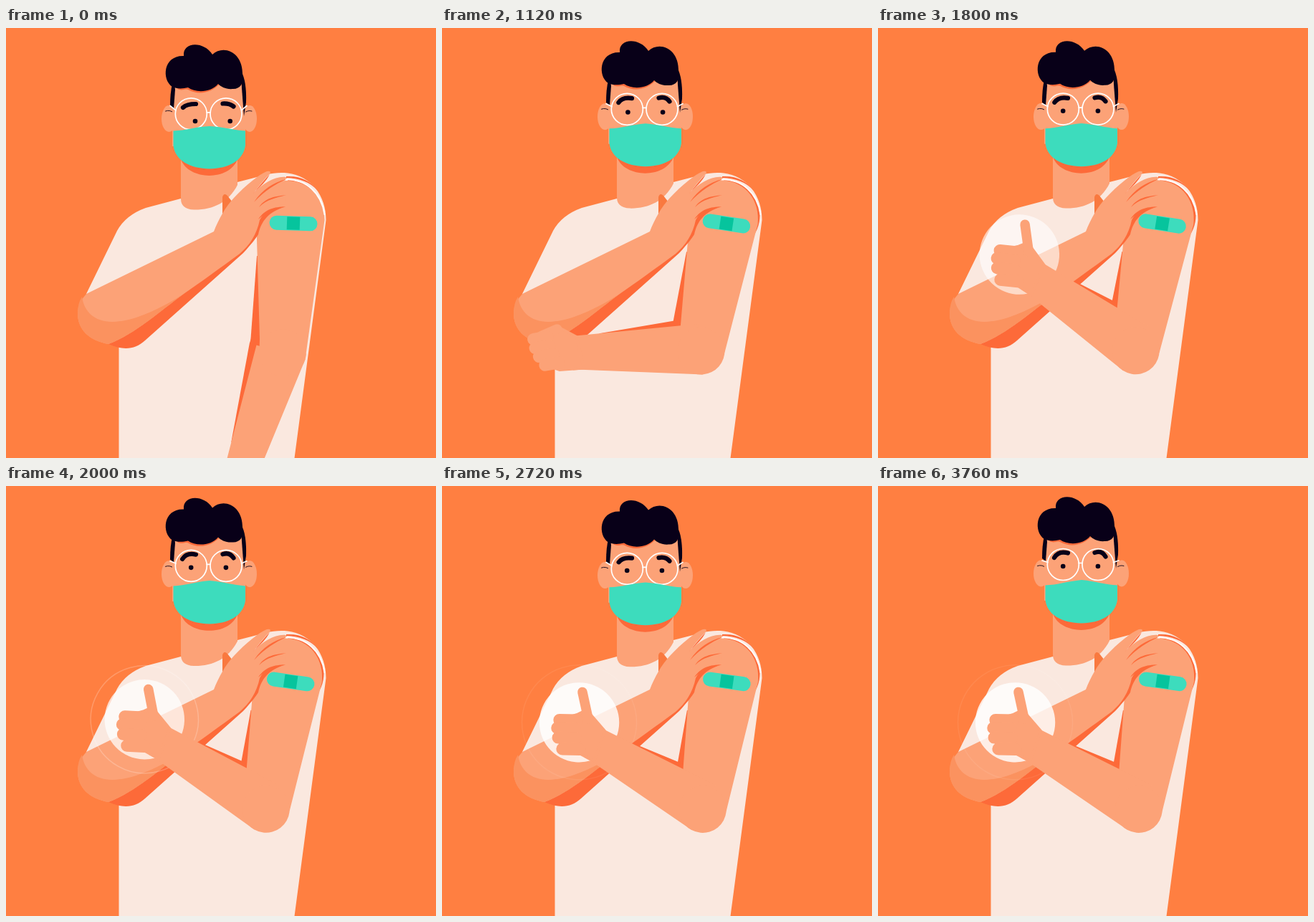
Write an HTML page with a canvas that moves like this. It is 600x600 px and loops after 4200 ms.

```html
<!DOCTYPE html>
<html lang="en">
<head>
<meta charset="utf-8">
<title>Vaccinated</title>
<style>
  html, body { margin: 0; width: 100%; height: 100%; overflow: hidden; background: #ff7f41; }
  canvas { display: block; width: 600px; height: 600px; }
</style>
</head>
<body>
<canvas id="stage" width="600" height="600"></canvas>
<script>
const ctx = document.getElementById('stage').getContext('2d');
const LOOP = 4200, STEP = 40;
const C = {
  bg: '#ff7f41', skin: '#fca277', elbow: '#fb925f', shade: '#fd6a39', thumb: '#f9793f',
  shirt: '#fae8df', hair: '#080018', mask: '#3ddcbd', pad: '#06c49d', white: '#fff'
};

const mix = (a, b, k) => a + (b - a) * k;
const rad = deg => deg * Math.PI / 180;
const part = (t, from, to) => Math.min(1, Math.max(0, (t - from) / (to - from)));
const ease = (t, from, to) => (1 - Math.cos(Math.PI * part(t, from, to))) / 2;
const easeOut = (t, from, to) => 1 - (1 - part(t, from, to)) ** 2;
const dip = (t, from, to) => Math.sin(Math.PI * part(t, from, to)) ** 2;

// Everything that moves, as a function of time
function poseAt(t) {
  const raise = ease(t, 840, 1320), pop = ease(t, 1440, 1680);
  return {
    swing: 10.4 * raise - 4.5 * easeOut(t, 1400, 2200),
    bend: 16 + 111 * raise - 9 * ease(t, 1400, 2200),
    lift: raise - 0.35 * dip(t, 1400, 2200) - dip(t, 2600, 3040),
    gaze: ease(t, 840, 1240),
    lids: 1 - 0.9 * (dip(t, 320, 520) + dip(t, 3560, 3760)),
    thumb: ease(t, 1400, 1640),
    discR: 55.7 * pop,
    discA: 0.6 * pop + 0.22 * ease(t, 1800, 2160),
    ringR: 56 + 24 * easeOut(t, 1760, 2200),
    ringA: t > 1800 ? mix(0.35, 0.07, ease(t, 1800, 2200)) : 0
  };
}

function fill(d, color) {
  ctx.fillStyle = color;
  ctx.fill(new Path2D(d));
}

function line(d, color, width) {
  ctx.strokeStyle = color;
  ctx.lineWidth = width;
  ctx.stroke(new Path2D(d));
}

function oval(x, y, rx, ry, color) {
  ctx.beginPath();
  ctx.ellipse(x, y, rx, ry, 0, 0, 2 * Math.PI);
  ctx.fillStyle = color;
  ctx.fill();
}

function ring(x, y, r, color, width) {
  ctx.beginPath();
  ctx.arc(x, y, r, 0, 2 * Math.PI);
  ctx.strokeStyle = color;
  ctx.lineWidth = width;
  ctx.stroke();
}

function within(place, draw) {
  ctx.save();
  place();
  draw();
  ctx.restore();
}

// Arm joints
const SHOULDER = [395, 237], ELBOW = [386, 453];

function upperPlace(p) {
  ctx.translate(...SHOULDER);
  ctx.rotate(rad(p.swing));
  ctx.translate(-SHOULDER[0], -SHOULDER[1]);
}

// x runs along the forearm, y towards its inner side
function forePlace(p) {
  const a = rad(p.swing), b = rad(p.bend);
  const dx = ELBOW[0] - SHOULDER[0], dy = ELBOW[1] - SHOULDER[1];
  const x = SHOULDER[0] + dx * Math.cos(a) - dy * Math.sin(a);
  const y = SHOULDER[1] + dx * Math.sin(a) + dy * Math.cos(a);
  ctx.transform(-Math.sin(b), Math.cos(b), -Math.cos(b), -Math.sin(b), x, y);
}

function drawShirt() {
  fill(`M157.5 600V440L112 371L155 283Q167 261 195 251L244 238L323 215L362 205
    C374 202 383 201.500 393 202.500C425 206 447 234 446.500 268L402.500 600Z`, C.shirt);
}

function drawSleeve() {
  ctx.beginPath();
  ctx.arc(393, 261.5, 50.5, -Math.PI / 2, Math.PI / 2);
  ctx.fillStyle = C.shade;
  ctx.fill();
}

function drawUpperArm() {
  fill(`M350 295C350 255 362 213 390 213C422 212 444 236 444.500 268
    L419 452L386 470L353.500 450L354 434Z`, C.skin);
  within(() => { ctx.translate(401, 272.5); ctx.rotate(rad(2)); }, () => {
    line('M-23.500 0H23.500', C.mask, 20);
    ctx.fillStyle = C.pad;
    ctx.fillRect(-9, -9, 18, 18);
  });
}

function drawHoldingArm() {
  fill(`M143 441C163 450 180 449 194 436L331 314C342 302 349 293 352 288
    C356 270 366 256 390 249.500L350 256L250 360Z`, C.shade);
  fill('M302 264V236Q304 229 309 234L316 243L308 258Z', C.thumb);
  const under = 'C215 395 180 427 143 441C115 436 100 420 100 398Q100 384';
  fill(`M112 371L290 284C297 266 306 250 318 237C335 219 352 205 364 200
    Q370 198.500 368.500 203C360 211 352 222 346 230
    C358 217 376 206.500 390 208Q394 209.500 391 211.500L374 220L391 233.500
    L389 249C372 250 360 256 354 268C350 288 340 303 326 315
    C300 334 270 356 248 371${under} 112 371Z`, C.skin);
  fill(`M106 375C112 414 155 430 248 371${under} 106 375Z`, C.elbow);
  // Gaps between the fingers
  fill(`M345 231C355 219 360 212 368 204C363 214 356 220 345 231Z
    M346 243C358 225 374 215 391 211C376 218 362 226 346 243Z
    M353 250C362 237 374 235 391 233C377 237 364 239 353 250Z
    M352 267C362 252 374 250 390 249C377 253 364 256 352 267Z`, C.shade);
  // Sleeve hem
  fill('M391 207C411 206 425 213 435 227C424 215 411 210 391 209Z', C.shade);
  line('M391 211.300C419 211.500 440 230 444.500 260', C.white, 2);
}

// A fist that opens its thumb
function drawHand(p) {
  const m = k => (a, b) => mix(a, b, k);
  const to = m(p.thumb);
  const finger = i => [to(232, 235) - to(1.5, 2.5) * i * i, to(33, 16) - to(12.3, 11.3) * i];
  const palm = [
    [172, 32], [to(194, 208), 46], [to(221, 216), 35], finger(0), finger(2), finger(3),
    [to(199, 193), -12], [165, -12]
  ];
  fill(`M${palm.join('L')}Z`, C.skin);
  line(`M${palm.join('L')}Z`, C.skin, 4);
  line(`M${to(198, 200)} ${to(45, 36)}L${to(221, 225)} ${to(37, 65.5)}`, C.skin, 13.5);
  for (let i = 0; i < 4; i++) line(`M${finger(i)}l${to(-20, -22)} ${to(2, 11)}`, C.skin, 17);
}

function drawForearm(p) {
  fill('M0 38L176 33.500L180 -14H169L18 -31L0 -33Z', C.skin);
  oval(0, 0, 33, 33, C.skin);
  drawHand(p);
}

function drawHalo(p) {
  const x = 209, y = 26;
  if (p.ringA) ring(x, y, p.ringR, `rgba(255,255,255,${p.ringA})`, 1.5);
  oval(x, y, p.discR, p.discR, `rgba(255,255,255,${p.discA})`);
}

function drawHead(p) {
  const k = p.lift;
  const shift = (n, draw) => within(() => ctx.translate(0, -n * k), draw);

  shift(3, () => fill('M244 165V238Q244 253 262 253.500C288 254 310 244 323 219V165Z', C.skin));
  shift(5, () => fill('M244 172V183C254 213 312 214 323 183V172Z', C.shade));
  shift(4.5, () => {
    oval(227.5, 126.5, 10.5, 18.5, C.skin);
    oval(340, 126.5, 10, 18.5, C.skin);
    line('M222.500 116Q229 113.500 235 119M332 119Q337 114 343 116', C.hair, 0.9);
  });
  fill(`M232 ${80 - 8 * k}H334V${165 - 5 * k}H232Z`, C.skin);

  shift(8, () => {
    fill('M234 70L236 86L234 113L229 109Q229 90 232 78Z', C.hair);
    fill('M328 60Q336 74 335 104L332 123L329 84Z', C.hair);
    fill('M236 80C241 91 249 84 254 86C270 95 288 89 297 79L290 70H240Z', C.shade);
    fill(`M232 82C217 72 219 38 248 39C246 19 276 18 288 37
      C303 23 331 33 330 66C332 77 327 85 317 85C307 86 300 82 296 78
      C286 90 265 91 254 83C246 85 238 85 232 82Z`, C.hair);
  });

  shift(13.5, () => {
    const arch = 2.5 * k;
    line(`M${247 - k} ${111 + arch}Q252 ${106 - arch} 265 ${106 + k}
      M302.500 ${105.5 + k}Q312 ${105 - arch} 317.500 ${109.5 + arch}`, C.hair, 6.2);
  });
  const eyeY = 130 - 10.5 * k - 7.5 * p.gaze;
  [264, 312.7].forEach(x => oval(x - 5.8 * p.gaze, eyeY, 3.3, 3.3 * p.lids, C.hair));

  const y = 119.8 - 10.3 * k, ear = 108.5 - 4.5 * k, hinge = y - 5 + 2 * k;
  [258.3, 307].forEach(x => ring(x, y, 22, C.white, 1.7));
  line(`M280.300 ${y - 2}H285M229 ${ear}L237 ${hinge}M336 ${ear}L328.500 ${hinge}`, C.white, 1.7);

  shift(5, () => fill(`M233.500 143.500C251 143 264 138 284 ${137 - k}C304 138 317 142.500 334 143.500
    V164C331 185 311 196 284 196.500C257 196 236 185 233.500 164Z`, C.mask));
}

function drawScene(t) {
  const p = poseAt(t);
  const upper = draw => within(() => upperPlace(p), draw);
  const fore = draw => within(() => forePlace(p), draw);

  ctx.lineCap = ctx.lineJoin = 'round';
  ctx.fillStyle = C.bg;
  ctx.fillRect(0, 0, 600, 600);
  drawShirt();
  drawHead(p);
  upper(() => fill('M350 318L341 440H362L357 318Z', C.shade));
  fore(() => fill('M-13 47.500L0 48L140 34.500L130 20H-13Z', C.shade));
  drawSleeve();
  upper(drawUpperArm);
  drawHoldingArm();
  fore(() => drawHalo(p));
  fore(() => drawForearm(p));
}

const start = performance.now();
function tick() {
  const t = (performance.now() - start) % LOOP;
  drawScene(Math.floor(t / STEP) * STEP);
  requestAnimationFrame(tick);
}
tick();
</script>
</body>
</html>
```
